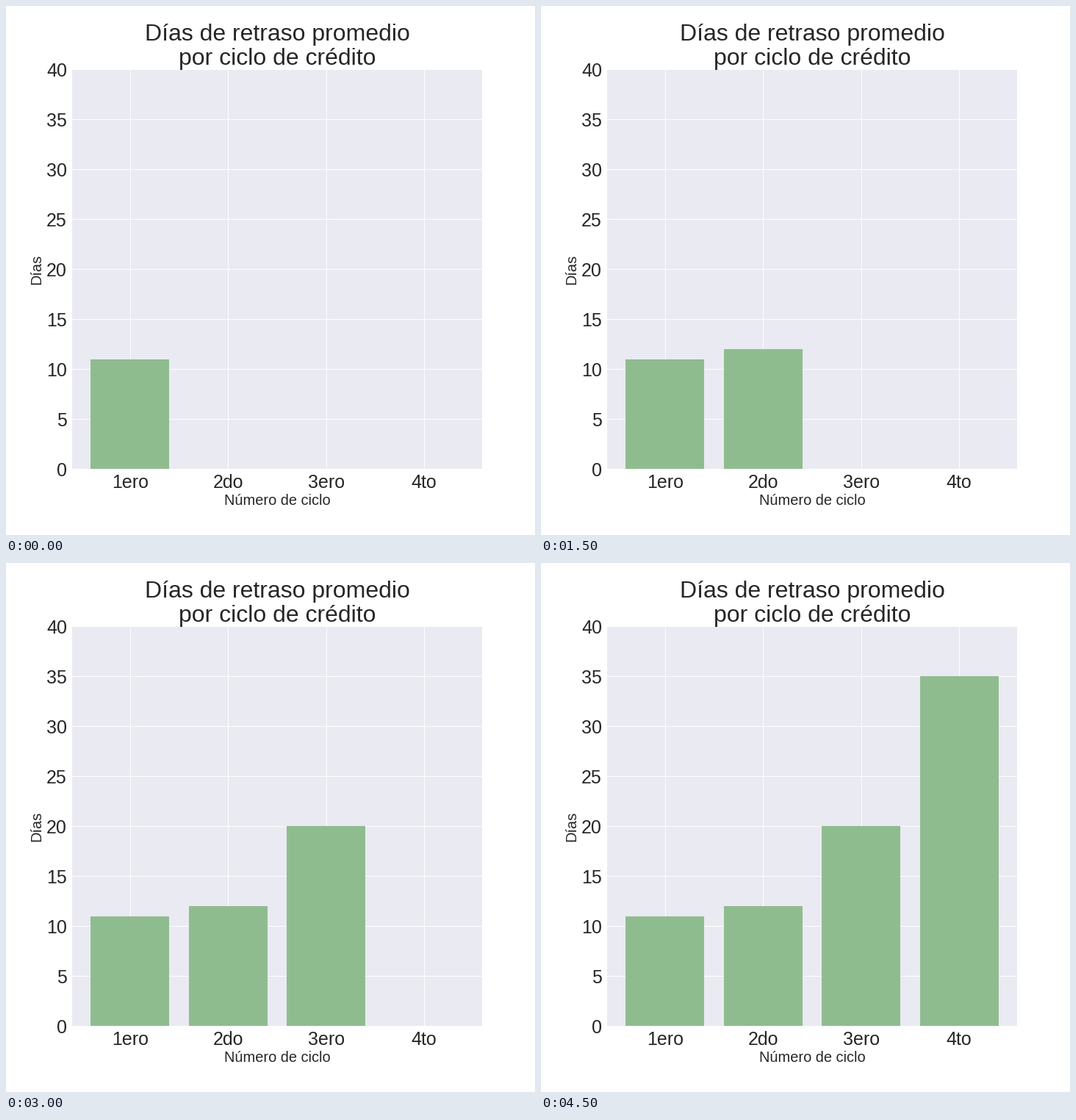
A matplotlib script for the animation above (6 s loop, 720 by 720 pixels).

```python
import matplotlib.pyplot as plt
from matplotlib.animation import FuncAnimation

SIZE, DPI = 720, 72
INK, PANEL, GREEN = "#262626", "#eaeaf2", "#8fbc8f"
CYCLES = ["1ero", "2do", "3ero", "4to"]
DELAYS = [11, 12, 20, 35]

plt.rcParams.update({
    "font.family": "Liberation Sans",
    "text.color": INK,
    "axes.labelcolor": INK,
    "xtick.color": INK,
    "ytick.color": INK,
})

fig = plt.figure(figsize=(SIZE / DPI, SIZE / DPI), dpi=DPI, facecolor="white")
ax = fig.add_axes([0.125, 0.125, 0.775, 0.755], facecolor=PANEL)


def caption(text, baseline, size):
    """Text centred over the axes, with its baseline in pixels from the top."""
    fig.text(0.5125, 1 - baseline / SIZE, text, fontsize=size,
             ha="center", va="baseline")


caption("Días de retraso promedio", 47, 32)
caption("por ciclo de crédito", 80, 32)
caption("Número de ciclo", 679, 20)
ax.set_ylabel("Días", fontsize=20, labelpad=4)

bars = ax.bar(range(len(CYCLES)), DELAYS, width=0.8, color=GREEN, linewidth=0)
ax.set_xlim(-0.59, 3.59)
ax.set_ylim(0, 40)
ax.set_xticks(range(len(CYCLES)), CYCLES)
ax.set_yticks(range(0, 41, 5))
ax.tick_params(length=0, pad=7, labelsize=25)
ax.set_axisbelow(True)
ax.grid(color="white", linewidth=1)
for spine in ax.spines.values():
    spine.set_visible(False)


def update(step):
    for i, bar in enumerate(bars):
        bar.set_visible(i <= step)
    return list(bars)


anim = FuncAnimation(fig, update, frames=len(CYCLES), interval=1500,
                     repeat=True, repeat_delay=0, blit=False)
plt.show()
```
